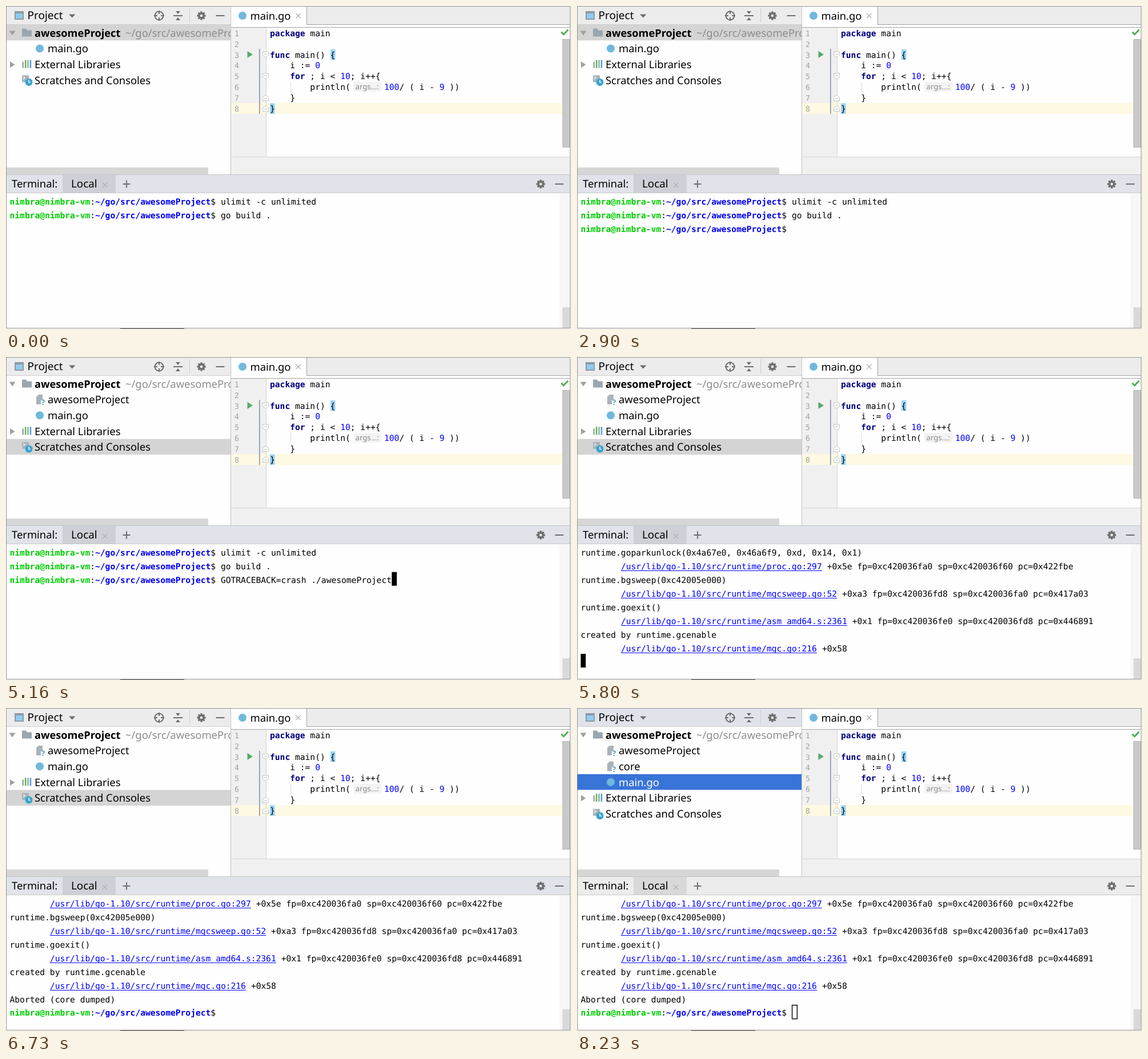
Animation, 989 px wide and 566 px high, one loop 8.3 s. Source, as an HTML page:

```html
<!DOCTYPE html>
<html lang="en">
<head>
<meta charset="utf-8">
<title>Core dump in the IDE terminal</title>
<style>
html, body { margin: 0; width: 100%; height: 100%; overflow: hidden; background: #fefefe; }
svg { display: block; }
text { white-space: pre; text-rendering: geometricPrecision; }
.ui { font: 18.4px "Noto Sans", "Open Sans", sans-serif; }
.mono { font: 14.62px "DejaVu Sans Mono", "Liberation Mono", monospace; }
.b { font-weight: bold; }
.num { font-size: 13.2px; }
</style>
</head>
<body>
<svg id="stage" width="989" height="566" viewBox="0 0 989 566"></svg>
<script>
const LOOP = 8300, CHAR = 8.8, LEFT = 6.5;
const GREY = '#ececec', BLUE = '#e0e3ea', PAPER = '#fefefe', INK = '#6e6e6e', EDGE = '#a2a2a2';
const stage = document.getElementById('stage');

const rect = (x, y, w, h, fill, extra = '') =>
  `<rect x="${x}" y="${y}" width="${w}" height="${h}" fill="${fill}" ${extra}/>`;
const path = (d, fill, stroke = 'none', w = 1) =>
  `<path d="${d}" fill="${fill}" stroke="${stroke}" stroke-width="${w}"/>`;
const dot = (x, y, r, fill) => `<circle cx="${x}" cy="${y}" r="${r}" fill="${fill}"/>`;
const text = (x, y, s, cls = 'ui', fill = '#000', extra = '') =>
  `<text x="${x}" y="${y}" class="${cls}" fill="${fill}" ${extra}>${s}</text>`;
const size = px => `style="font-size:${px}px"`;
const span = (s, fill, bold) => `<tspan fill="${fill}" class="${bold ? 'b' : ''}">${s}</tspan>`;

// Icons
function gear(x, y) {
  let teeth = '';
  for (let a = 0; a < 360; a += 45)
    teeth += rect(x - 1.7, y - 7.6, 3.4, 5, INK, `transform="rotate(${a} ${x} ${y})"`);
  return teeth + `<circle cx="${x}" cy="${y}" r="4.1" fill="none" stroke="${INK}" stroke-width="3.2"/>`;
}
const cross = (x, y) => path(`M${x - 4} ${y - 4}l8 8m0 -8l-8 8`, 'none', '#b0b0b0', 1.3);
const minus = (x, y) => rect(x, y - 1, 15, 2, INK);
const mascot = (x, y) => dot(x, y, 7, '#6fb9dc');
const page = y => path(`M57 ${y - 9}h7v9h-3v8h-8v-13z`, '#a9b3ba') +
  path(`M53 ${y - 6}l3 -3v3z`, '#c4cbd0') +
  text(62, y + 9, '?', 'ui b', '#4a9cc4', size(13));
const folder = y => path(`M28 ${y - 7}h7l2 3h8v11h-17z`, '#9aa7b0');
const books = y => ['#9aa7b0', '#62b543', '#9aa7b0', '#40a8d0'].map((c, i) =>
  rect(28.5 + i * 4.4, y - 8 + (i === 0 ? 3 : 0), 2.5, i === 0 ? 11 : 14, c)).join('');
const scratch = y => path(`M28 ${y - 9}h12v7h-5v5h-7z`, '#a9b3ba') +
  path(`M30 ${y - 7}l3 2.5l-3 2.5`, 'none', '#fff', 1.2) +
  dot(40, y + 3, 6.5, '#3ba3cf') + path(`M40 ${y - 1}v4.5h3`, 'none', '#fff', 1.4);

function projectHeader(focused) {
  return rect(1, 1, 392, 31, focused ? BLUE : GREY) + rect(1, 32, 392, 1, '#cfcfcf') +
    rect(15, 9, 16, 15, '#8f9aa3') + rect(17, 13, 12, 9, '#8fcdf0') +
    text(37.5, 23, 'Project', 'ui', '#000', size(19)) +
    path('M110 14.5h11.5l-5.75 6z', INK) +
    `<circle cx="268" cy="17" r="7.5" fill="none" stroke="${INK}" stroke-width="2"/>` +
    path('M268 8v6m0 6v6M259 17h6m6 0h6', 'none', INK, 2) +
    path('M293 17h16', 'none', INK, 2) +
    path('M297 9h8l-4 5zM297 25h8l-4 -5z', INK) +
    rect(321, 4, 1, 25, '#cccccc') + gear(342, 17) + minus(367.5, 17);
}

const rowY = i => 47.3 + i * 27.7;

function tree(s) {
  const files = ['main.go'];
  if (s.built) files.unshift('awesomeProject');
  if (s.dumped) files.splice(1, 0, 'core');
  const n = files.length, sel = s.selected;
  let out = rect(1, rowY(sel) - 14.5, 392, 27.5, s.blur ? '#3874d8' : '#d4d4d4');
  const ink = i => s.blur && i === sel ? '#fff' : '#000';
  out += path('M5.5 43.5h11l-5.5 8z', '#a0a0a0') + folder(46.5) +
    text(50, 53.6, 'awesomeProject', 'ui b', ink(0), size(18.2)) +
    text(209, 53.6, '~/go/src/awesomeProject', 'ui', '#8c8c8c', 'clip-path="url(#side)"');
  files.forEach((name, k) => {
    const i = k + 1, y = rowY(i);
    out += (name === 'main.go' ? mascot(59, y - 0.5) : page(y)) + text(73, y + 6.3, name, 'ui', ink(i));
  });
  const lib = rowY(n + 1), con = rowY(n + 2);
  return out + path(`M7 ${lib - 5.5}v11l8.5 -5.5z`, '#a0a0a0') + books(lib) +
    text(50, lib + 6.3, 'External Libraries', 'ui', ink(n + 1)) +
    scratch(con) + text(50, con + 6.3, 'Scratches and Consoles', 'ui', ink(n + 2)) +
    rect(1, 283, 353, 12, '#d6d6d6');
}

// Editor
const lineY = i => 47.5 + i * 18.9;
const fold = (y, d) => path(`M449.5 ${y - 5 * d}h10v${6 * d}l-5 ${4 * d}l-5 ${-4 * d}z`, '#fff', '#c2c2c2') +
  path(`M452 ${y - d}h5`, 'none', '#b0b0b0');

function editor() {
  const kw = s => span(s, '#000080', true), num = s => span(s, '#0000ff');
  const code = [
    kw('package') + ' main', '', kw('func') + ' main() {', '    i := ' + num('0'),
    '    ' + kw('for') + ' ; i &lt; ' + num('10') + '; i++{', '        println(', '    }', '}'
  ];
  let out = rect(394, 1, 593, 31, GREY) + rect(394, 1, 132, 36, '#fff') +
    rect(526, 1, 1, 32, EDGE) + rect(526, 32, 461, 1, EDGE) +
    rect(394, 37, 593, 1, EDGE) + mascot(414, 17) +
    text(427.5, 23.8, 'main.go') + cross(511.5, 17) +
    rect(394, 38, 61, 226, '#f0f0f0') + rect(394, 170, 580, 19, '#fdf9e2') +
    rect(455, 38, 1, 226, '#d4d4d4') + rect(443, 75, 1.5, 114, '#7f8c9c') +
    rect(568, 76, 8.5, 18.5, '#99d3f5') + rect(462, 170.5, 8.5, 18.5, '#99d3f5') +
    rect(498, 133, 1, 19, '#dcdcdc') + path('M422.5 79v12l9.5 -6z', '#59a869') +
    fold(lineY(2), 1) + fold(lineY(4), 1) + fold(lineY(6), -1) + fold(lineY(7), -1);
  code.forEach((s, i) => {
    const y = lineY(i) + 5.2;
    out += text(400, y, i + 1, 'mono num', '#a0a0a0') + text(462, y, s, 'mono');
  });
  return out + rect(608, 133, 49, 17, '#f3f3f3', 'rx="3"') +
    text(611.5, 146, 'args...:', 'ui', '#8a8a8a', size(13.2)) +
    text(662, lineY(5) + 5.2, num('100') + '/ ( i - ' + num('9') + ' ))', 'mono') +
    path('M972 45.5l4 4.5l8 -8.5', 'none', '#4caf50', 2.8) +
    rect(974.5, 58.5, 12, 189, '#c9c9c9', 'stroke="#b4b4b4"') +
    rect(394, 264, 593, 31, '#f0f0f0') + rect(394, 264, 593, 1, '#d6d6d6');
}

function terminalHeader(focused) {
  return rect(1, 296, 986, 32, focused ? BLUE : GREY) +
    rect(99, 296, 93, 32, focused ? '#cdd0d6' : '#d9d9d9') +
    rect(1, 295, 986, 1, '#c4c4c4') + rect(1, 327, 986, 1, '#c8c8c8') +
    text(10, 318, 'Terminal:') + text(114, 318, 'Local', 'ui', '#000', size(18.8)) +
    cross(173, 314) + path('M204.5 312h13m-6.5 -6.5v13', 'none', INK, 2) +
    gear(936, 312) + minus(961, 312);
}

// Terminal text
const USER = 'nimbra';
const prompt = (cmd = '') => ({ head: true, cmd });
const link = (file, rest) => ({ url: '/usr/lib/go-1.10/src/runtime/' + file, rest });
const shell = [prompt('ulimit -c unlimited'), prompt('go build .')];
const trace = [
  'runtime.goparkunlock(0x4a67e0, 0x46a6f9, 0xd, 0x14, 0x1)',
  link('proc.go:297', '+0x5e fp=0xc420036fa0 sp=0xc420036f60 pc=0x422fbe'),
  'runtime.bgsweep(0xc42005e000)',
  link('mgcsweep.go:52', '+0xa3 fp=0xc420036fd8 sp=0xc420036fa0 pc=0x417a03'),
  'runtime.goexit()',
  link('asm_amd64.s:2361', '+0x1 fp=0xc420036fe0 sp=0xc420036fd8 pc=0x446891'),
  'created by runtime.gcenable',
  link('mgc.go:216', '+0x58')
];
const screens = [
  shell,
  [...shell, prompt()],
  [...shell, prompt('GOTRACEBACK=crash ./awesomeProject')],
  [...trace, ''],
  [...trace.slice(1), 'Aborted (core dumped)', prompt()]
];

function termLine(item, i) {
  const y = 348.2 + i * 23.9;
  if (item.head) {
    return text(LEFT, y, span(`${USER}@${USER}-vm`, '#00cd00', true) + ':' +
      span('~/go/src/awesomeProject', '#0000ee', true) + '$ ' + item.cmd, 'mono');
  }
  if (item.url) {
    // The underline hides everything that hangs below it
    const x = LEFT + 8 * CHAR, w = item.url.length * CHAR, under = Math.round(y + 2.2);
    return text(x, y, item.url, 'mono', '#0000ff') + rect(x, under, w, 4, PAPER) +
      rect(x, under, w, 1, '#0000ff') + text(x + w + CHAR, y, item.rest, 'mono');
  }
  return text(LEFT, y, item, 'mono');
}

function cursor(lines, kind) {
  const i = lines.length - 1, last = lines[i];
  const x = LEFT + (last.head ? 42 + last.cmd.length : 0) * CHAR;
  const y = 329 + i * 23.9;
  if (kind === 'block') return rect(x, y, 8.8, 24, '#000');
  return kind === 'box' ? rect(x + 0.5, y + 0.5, 8.8, 24, 'none', 'stroke="#000" stroke-width="1.4"') : '';
}

// Timeline: each entry starts at its time and holds until the next
const screenSteps = [[0, 0], [2100, 1], [3560, 2], [5400, 3], [6230, 4]];
const blinkOn = [[300, 800], [1300, 1800], [2100, 2600], [4000, 4500], [5000, 5900], [6230, 6650]];
const blurred = [[3000, 3500], [6880, LOOP]];
const within = (list, t) => list.some(([a, b]) => t >= a && t < b);

function stateAt(t) {
  const blur = within(blurred, t), built = t >= 3000, dumped = t >= 6880;
  return {
    screen: screenSteps.filter(([at]) => t >= at).pop()[1],
    blur, built, dumped,
    selected: dumped ? 3 : built ? 4 : 0,
    cursor: blur ? 'box' : within(blinkOn, t) ? 'block' : 'none'
  };
}

const base = '<defs><clipPath id="side"><rect x="1" y="33" width="392" height="250"/></clipPath></defs>' +
  rect(0, 0, 989, 566, PAPER) + editor() +
  rect(969, 329, 18, 235, '#f7f7f7') + rect(974, 528, 13, 36, '#d9d9d9');
const frame = rect(393, 1, 1, 294, '#c0c0c0') +
  rect(0.5, 0.5, 987, 564, 'none', 'stroke="#929292"') + rect(200, 564.5, 112, 1.5, '#777');

let shown = '';
function draw() {
  const s = stateAt(performance.now() % LOOP), key = JSON.stringify(s);
  if (key !== shown) {
    shown = key;
    const lines = screens[s.screen];
    stage.innerHTML = base + projectHeader(s.blur) + tree(s) + terminalHeader(!s.blur) +
      lines.map(termLine).join('') + cursor(lines, s.cursor) + frame;
  }
  requestAnimationFrame(draw);
}
draw();
</script>
</body>
</html>
```
